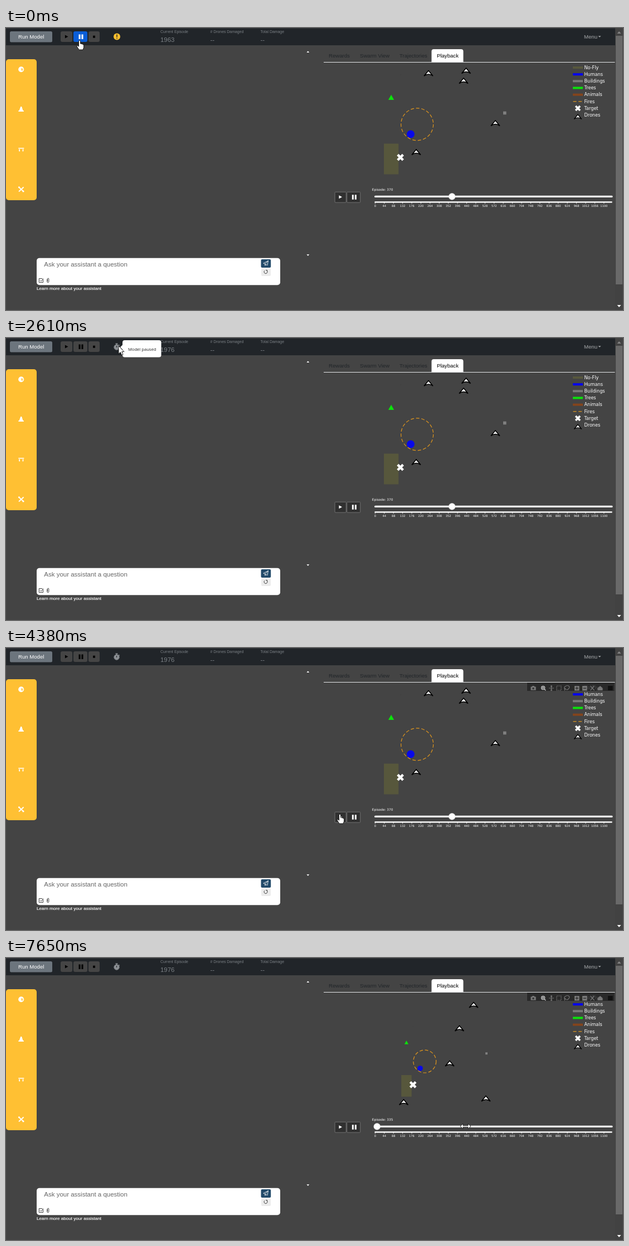
Recreate the animation shown at these times as an HTML page. Size 1107x506 px, loop 8000 ms.

```html
<!DOCTYPE html>
<html lang="en">
<head>
<meta charset="utf-8">
<title>Drone playback</title>
<style>
html, body { margin: 0; width: 100%; height: 100%; overflow: hidden; background: #444; }
svg { display: block; width: 1107px; height: 506px; }
text { font-family: "Liberation Sans", Arial, sans-serif; font-size: 9.6px; white-space: pre; }
.dash { fill: none; stroke: #e0961c; stroke-width: 1.2; stroke-dasharray: 6 3.6; vector-effect: non-scaling-stroke; }
.head text { fill: #7b8085; font-size: 6.9px; }
.head .big { font-size: 11.4px; }
.plot { font-family: "DejaVu Sans", Verdana, sans-serif; fill: #fff; }
.line { fill: none; stroke: #fff; stroke-width: 1.2; }
#bar .line { stroke: #777; }
</style>
</head>
<body>
<svg viewBox="0 0 1107 506">
  <defs>
    <path id="drone" d="M-8 5L0-4.6L8 5Q0-1-8 5Z" fill="#fff" stroke="#000" stroke-width="1.6"/>
    <path id="cross" d="M-4.8-4.8L4.8 4.8M4.8-4.8L-4.8 4.8" stroke="#fff" stroke-width="4.4"/>
    <path id="playIcon" d="M-2.6-3L3 0L-2.6 3Z"/>
    <path id="pauseIcon" d="M-4-4.2h3v8.4h-3zM1-4.2h3v8.4h-3z"/>
    <clipPath id="area"><rect x="570" y="62" width="522" height="211"/></clipPath>
  </defs>
  <rect width="1107" height="506" fill="#444"/>

  <g class="head">
    <rect width="1093" height="31" fill="#212529"/>
    <rect width="1107" height="1" fill="#33363a"/>
    <rect x="7" y="6" width="76" height="19.5" rx="2.5" fill="#6c757d"/>
    <text x="22" y="18.6" style="fill:#fff;font-size:9.6px">Run Model</text>
    <g fill="#454545">
      <rect x="98" y="6" width="21" height="19" rx="3"/>
      <rect id="pauseButton" x="121" y="6" width="25" height="19" rx="3"/>
      <rect x="148" y="6" width="20" height="19" rx="3"/>
    </g>
    <use href="#playIcon" x="108.5" y="15.5"/>
    <use id="pauseMark" href="#pauseIcon" x="134.5" y="15.7"/>
    <rect x="156" y="13.7" width="4" height="4"/>
    <g id="warning">
      <circle cx="199" cy="15.5" r="6" fill="#ffbf2e"/>
      <path d="M199 11.6v4.8M199 17.7v1.6" stroke="#212529" stroke-width="1.5"/>
    </g>
    <g id="watch" fill="none" stroke="#8b8f93">
      <circle cx="198.5" cy="16.6" r="4.6" fill="#8b8f93"/>
      <path d="M196.5 10.3h4M198.5 10v3M202 12.2l1.6 1.4" stroke-width="1.4"/>
      <path d="M198.5 14v3" stroke="#212529" stroke-width="1.2"/>
    </g>
    <text x="277" y="9.3">Current Episode</text>
    <text x="366.5" y="9.3"># Drones Damaged</text>
    <text x="456.5" y="9.3">Total Damage</text>
    <text class="big" id="count" x="277" y="24.6"></text>
    <text class="big" x="366.5" y="24.6">--</text>
    <text class="big" x="456.5" y="24.6">--</text>
    <text x="1037" y="18.6" style="fill:#a5a8aa;font-size:9.6px">Menu</text>
    <path d="M1062.5 14.2h5l-2.5 2.6z" fill="#a5a8aa"/>
  </g>

  <rect x="1093" width="14" height="506" fill="#424242"/>
  <rect x="1094" y="14" width="12" height="446" fill="#696969"/>
  <path d="M1096.5 10h7l-3.5-4z" fill="#858585"/>
  <path d="M1096.5 497h7l-3.5 4z" fill="#fff"/>

  <rect y="56" width="55" height="253" rx="5" fill="#ffc033"/>
  <g fill="#fff">
    <circle cx="27.2" cy="74.3" r="5"/>
    <path d="M27 72l4 1-1 4-3-1z" fill="#ffd470"/>
    <path d="M26.3 141h1.8l2.4 7h1.3v2h-9.4v-2h1.3z"/>
    <path d="M22.3 215h10v1.6h-10zM23 217.5h2v4h-1.6zM29.6 217.5h2l-.4 4h-1.6z"/>
    <path class="line" stroke-width="2" d="M23 285.5l8.6 8M31.6 285.5l-8.6 8" style="stroke-width:1.8"/>
    <circle cx="23.4" cy="285.8" r="1.5"/><circle cx="31" cy="293" r="1.6"/>
    <path d="M539.4 44h4.8l-2.4-2.7z"/>
    <path d="M539.4 406.3h4.8l-2.4 2.7z"/>
    <rect x="55" y="412.7" width="437" height="48.5" rx="5"/>
  </g>
  <text x="68.3" y="428" fill="#666" style="font-size:11.5px">Ask your assistant a question</text>
  <rect x="457.5" y="415" width="17.7" height="15" rx="2" fill="#224a6a"/>
  <path class="line" d="M470.5 417.6l-8.7 4.6 3 1.4 4 2.2zl-5.7 6v2.8l1.7-1.8" style="stroke-width:.8"/>
  <rect x="458" y="430.5" width="17" height="14.5" rx="2" fill="#ececec"/>
  <g fill="none" stroke="#333" stroke-width=".9">
    <path d="M464 435.3a3 3 0 1 0 4.2.2M466 434.6h2.6v2.3"/>
    <path d="M66.5 451v5.5h-7.2v-7h6M61 452.5l2 2 4-5"/>
    <path d="M73.8 450.5v4.7a1.5 1.5 0 0 0 3 0v-5a1 1 0 0 0-2.2 0v4.6"/>
  </g>
  <text x="55" y="469.6" fill="#fff" style="font-size:8.1px" stroke="#fff" stroke-width=".15">Learn more about your assistant</text>

  <path d="M763.5 62V42q0-4 4-4h49q4 0 4 4v20z" fill="#fff"/>
  <path d="M570 61.5h522.5" stroke="#e4e6e8"/>
  <g fill="#212529">
    <text x="579" y="52.6">Rewards</text>
    <text x="635" y="52.6">Swarm View</text>
    <text x="706" y="52.6">Trajectories</text>
    <text x="773" y="52.6" fill="#000">Playback</text>
  </g>

  <g clip-path="url(#area)">
    <g id="world">
      <rect x="678" y="207.5" width="26.3" height="55" fill="#57573c"/>
      <rect x="892" y="149.7" width="5.6" height="5.6" fill="#808080"/>
      <path d="M686 129h10.2l-5.1-9.2z" fill="#0be30b"/>
      <circle cx="726" cy="190.5" r="6.9" fill="#0909e8"/>
      <circle class="dash" cx="737.7" cy="172.8" r="29"/>
      <rect x="707.5" y="83.5" width="1" height="1" fill="#383838"/>
    </g>
    <use id="target" href="#cross"/>
    <g id="drones"></g>
  </g>
  <g id="legend"></g>

  <g id="bar" fill="#777">
    <rect id="barBack" x="935" y="62" width="156.5" height="15" fill="#242424" fill-opacity=".82"/>
    <path d="M941.5 69.5h2l1-1.5h3l1 1.5h2.2v6.2h-9.2z"/><circle cx="946" cy="72.6" r="1.8" fill="#333"/>
    <g fill="none" stroke="#bbb" stroke-width="1.5"><circle cx="963.6" cy="71.4" r="3"/><path d="M965.8 73.6l2.6 2.6M962 71.4h3.2M963.6 69.8v3.2"/></g>
    <path class="line" d="M974 72h9M978.5 67.5v9M977 69l1.5-1.5 1.5 1.5M977 75l1.5 1.5 1.5-1.5"/>
    <rect class="line" x="988" y="68" width="8" height="8" stroke-dasharray="2 1.2"/>
    <path class="line" d="M1003 74.5q-3-4 1-6t6 0-1 5-5 0-1.5 3"/>
    <path d="M1020 68h8.6v8.4h-8.6z"/><path d="M1034 68h8.6v8.4h-8.6z"/>
    <path d="M1021.7 72.2h5.2M1024.3 69.6v5.2M1035.7 72.2h5.2" stroke="#333" stroke-width="1.4"/>
    <path class="line" d="M1048.5 68l7 8M1055.5 68l-7 8"/>
    <path d="M1061.5 72l4.5-4 4.5 4v4h-9z"/>
    <rect x="1080" y="68" width="8.6" height="8" fill="#111"/>
  </g>

  <g fill="#303030" stroke="#707070">
    <rect x="590" y="294.3" width="20.2" height="18.8" rx="1"/>
    <rect x="611.7" y="294.3" width="24" height="18.8" rx="1"/>
  </g>
  <g fill="#fff">
    <use href="#playIcon" x="600" y="303.3"/>
    <use href="#pauseIcon" x="624.8" y="303.5"/>
    <rect x="661" y="300.8" width="427.5" height="3.2" rx="1.6"/>
    <rect x="661.5" y="311.2" width="426" height="2.4"/>
  </g>
  <g id="ticks"></g>
  <text id="label" class="plot" x="656.8" y="291.8" style="font-size:5.8px"></text>
  <circle id="handle" cy="302.4" r="5.9" fill="#fff" stroke="#ccc" stroke-width=".6"/>

  <g id="status">
    <rect y="488" width="213" height="18" fill="#3c3c3c"/>
    <text x="4" y="500.5" fill="#222" style="font-size:10.3px">https://run-hbi71963d14e0.herokuapp.com/#</text>
  </g>
  <g id="tip">
    <path d="M205 16.5l5-5v10z" fill="#fff"/>
    <rect x="209" y="4" width="69.5" height="30.5" rx="4" fill="#fff"/>
    <text x="219" y="22.6" fill="#222" style="font:7.6px 'Open Sans',sans-serif">Model paused</text>
  </g>

  <g id="cursor" fill="#fff" stroke="#000" stroke-width=".8">
    <path id="hand" d="M-1.5 1Q0-1 1.5 1V6.2Q3.2 5.4 4 7Q5.4 6.2 6.1 7.7Q7.6 7.5 7.5 9.3V13L6 17H-1L-4.9 10.8Q-4.8 8.6-3 9.8L-1.5 11.3Z"/>
    <path id="arrow" d="M0 0V14.5L3.3 11.5L5.5 16.5L8 15.4L5.9 10.6H10Z"/>
    <path id="resize" d="M-9.5 0l5-4.5v3.2h9v-3.2l5 4.5-5 4.5v-3.2h-9v3.2z"/>
  </g>
</svg>
<script>
const $ = id => document.getElementById(id);
const clamp = v => Math.max(0, Math.min(1, v));
const ramp = (t, a, b) => clamp((t - a) / (b - a));
const show = (id, on) => $(id).setAttribute('opacity', +on);
const place = (el, x, y) => el.setAttribute('transform', `translate(${x} ${y})`);

const rows = [['No-Fly', '#57573c'], ['Humans', '#0000f5'], ['Buildings', '#777'], ['Trees', '#0be30b'],
  ['Animals', '#84441c'], ['Fires'], ['Target'], ['Drones']];
$('legend').innerHTML = rows.map(([name, color], i) => {
  const y = 71 + 12.17 * i;
  const sign = color ? `<rect x="1017" y="${y - 2}" width="18" height="4" fill="${color}"/>`
    : i == 5 ? `<path class="dash" d="M1017.500 ${y}h16.500"/>`
    : i == 6 ? `<use href="#cross" transform="translate(1026 ${y})scale(.82)"/>`
    : `<use href="#drone" transform="translate(1026 ${y + 3})scale(.85)"/>`;
  return `${sign}<text class="plot" x="1037.500" y="${y + 2.8}" style="font-size:8.1px">${name}</text>`;
}).join('');

$('ticks').innerHTML = Array.from({ length: 26 }, (_, i) => {
  const x = 662.3 + 16.42 * i;
  return `<path d="M${x} 312v3.200" stroke="#fff" stroke-width=".8"/>
    <text class="plot" x="${x}" y="321.400" text-anchor="middle" style="font-size:5.1px">${44 * i}</text>`;
}).join('');

// Drone poses: paused episode, first episode, then start and end of the zoomed run.
const paused = [[758, 81], [825.5, 76.5], [821, 94.5], [878, 170.5], [736, 222.5]];
const first = [[863, 28], [824, 85], [804, 172], [891, 260.5], [689, 273.5]];
const runStart = [[838, 85], [812, 124], [798, 186], [860, 248], [717, 256]];
const runEnd = [[839, 84], [813.5, 126], [796, 189], [861, 252], [713.5, 258.5]];
const steps = [5640, 5970, 6330, 6720, 7050, 7380, 7650];
$('drones').innerHTML = '<use href="#drone"/>'.repeat(5);
const drones = [...$('drones').children];

// Cursor keys: time, tip x, tip y, shape from this key on.
const path = [
  [0, 132, 22, 'hand'], [30, 132, 22, 'hand'], [110, 135, 36, 'arrow'], [210, 137, 55, 'arrow'],
  [570, 137, 55, 'arrow'], [690, 137, 54, 'arrow'], [1170, 137, 54, 'arrow'], [1350, 138, 53, 'arrow'],
  [1480, 138, 53, 'arrow'], [1750, 172, 36, 'arrow'], [2010, 198, 20, 'arrow'], [2430, 198, 20, 'arrow'],
  [2610, 202, 14, 'arrow'], [2790, 202, 14, 'arrow'], [3000, 440, 52, 'arrow'], [3200, 700, 72, 'arrow'],
  [3330, 775, 49, 'hand'], [3390, 780, 43, 'hand'], [3540, 779, 45, 'hand'], [3660, 779, 45, 'hand'],
  [3720, 738, 92, 'arrow'], [3900, 624, 225, 'arrow'], [4200, 602, 285, 'arrow'], [4380, 599, 298, 'hand'],
  [4440, 599, 300, 'hand'], [4530, 600, 304, 'hand'], [4860, 600, 304, 'hand'], [5040, 667, 319, 'hand'],
  [5240, 667, 319, 'hand'], [5280, 665, 304, 'hand'], [6720, 665, 304, 'hand'], [6780, 670, 302, 'resize'],
  [7440, 824.5, 302, 'resize'], [8000, 824.5, 302, 'resize']];

function moveCursor(t) {
  const i = path.findIndex(k => k[0] > t);
  const a = path[i - 1], b = path[i], k = ramp(t, a[0], b[0]);
  const x = a[1] + (b[1] - a[1]) * k;
  place($('cursor'), x, a[2] + (b[2] - a[2]) * k);
  for (const shape of ['hand', 'arrow', 'resize']) show(shape, shape == a[3]);
  return x;
}

function draw() {
  const t = performance.now() % 8000;
  const x = moveCursor(t);
  const pressed = t < 60;
  $('pauseButton').setAttribute('fill', pressed ? '#0b5ed7' : '#454545');
  $('pauseMark').setAttribute('fill', pressed ? '#fff' : '#000');
  $('count').textContent = t < 420 ? 1963 : 1976;
  show('warning', t < 1800);
  show('watch', t >= 1800);
  show('tip', ramp(t, 2430, 2580) - ramp(t, 2790, 2940));
  show('bar', ramp(t, 3200, 3400));
  show('barBack', ramp(t, 3660, 3840));
  show('status', ramp(t, 3420, 3540) - ramp(t, 3720, 4080));

  const reset = t >= 4980, zoomed = t >= 5250;
  const step = steps.filter(s => t >= s).length;
  const part = step / steps.length;
  $('world').setAttribute('transform', zoomed ? 'translate(730 227.3)scale(.705)translate(-707.5 -232)' : '');
  place($('target'), ...(zoomed ? [730.2, 227.3] : [707.6, 232.2]));
  drones.forEach((el, i) => {
    const pos = zoomed ? runStart[i].map((v, j) => v + (runEnd[i][j] - v) * part)
      : (reset ? first : paused)[i];
    place(el, ...pos);
  });
  $('handle').setAttribute('cx', !reset ? 800.2 : zoomed ? 662.7 + 3 * part : 662.3);
  const episode = !reset ? 370 : !zoomed ? 0 : t < 6780 ? step + 1
    : Math.min(335, Math.round((x - 662) / 0.373));
  $('label').textContent = 'Episode: ' + episode;
  requestAnimationFrame(draw);
}
draw();
</script>
</body>
</html>
```
